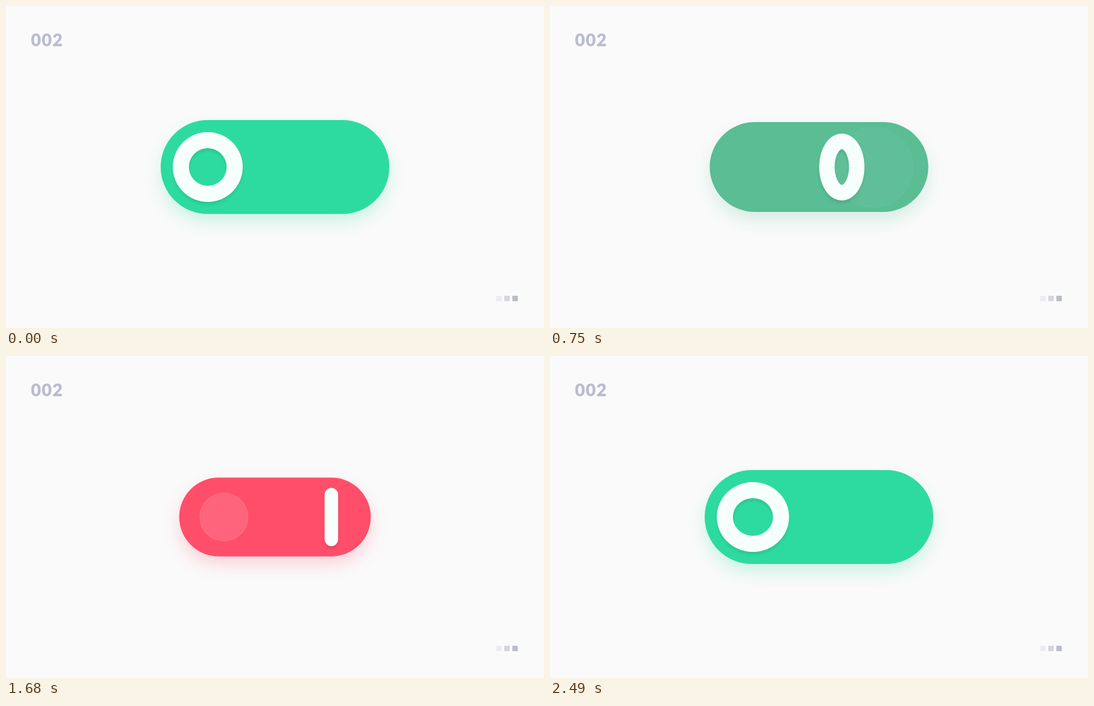
Animation, 800 px wide and 480 px high, one loop 2520 ms. Source, as an HTML page with a canvas:

```html
<!DOCTYPE html>
<html lang="en">
<head>
<meta charset="utf-8">
<title>Toggle switch</title>
<style>
  html, body { margin: 0; width: 100%; height: 100%; overflow: hidden; background: #fafafa; }
  canvas { position: absolute; left: 0; top: 0; }
  .label {
    position: absolute; left: 37px; top: 34px;
    font: 900 26px/32px Lato, sans-serif; letter-spacing: .9px; color: #b8bdce;
  }
  .dot { position: absolute; top: 432px; width: 8px; height: 8px; }
</style>
</head>
<body>
<canvas id="stage" width="800" height="480"></canvas>
<div class="label">002</div>
<div class="dot" style="left:729px;background:#ecedf0"></div>
<div class="dot" style="left:741px;background:#d2d5dd"></div>
<div class="dot" style="left:753px;background:#b8bdce"></div>
<script>
const ctx = document.getElementById('stage').getContext('2d');
const STEP = 30, LOOP = 2520;
const CX = 400, CY = 240;
const GREEN = [45, 219, 160], RED = [255, 78, 106];
const OFF_LAG = 39; // steps between the two taps

// knob ring width over time: [step, width]
const WIDTHS = [
  [17, 80], [20, 73], [23, 60], [26, 39.5], [28, 20], [30, 10], [33, 6], [37, 4], [41, 0],
  [56, 0], [59, 7], [62, 20], [65, 40.5], [67, 60], [70, 80], [73, 87], [77, 87.5], [83, 83.5]
];

const clamp = x => Math.min(1, Math.max(0, x));
const span = (n, a, b) => clamp((n - a) / (b - a));
const smooth = t => t * t * (3 - 2 * t);
const cubic = t => t < .5 ? 4 * t ** 3 : 1 - 4 * (1 - t) ** 3;
const mix = (a, b, t) => a + (b - a) * t;

function lookup(table, n) {
  if (n <= table[0][0]) return table[0][1];
  for (let i = 1; i < table.length; i++) {
    const [a, va] = table[i - 1], [b, vb] = table[i];
    if (n <= b) return mix(va, vb, (n - a) / (b - a));
  }
  return table[table.length - 1][1];
}

function shadow(color, y, blur) {
  ctx.shadowColor = color;
  ctx.shadowOffsetY = y;
  ctx.shadowBlur = blur;
}

function pillPath(s) {
  ctx.beginPath();
  ctx.roundRect(CX - 170 * s, CY - 70 * s, 340 * s, 140 * s, 70 * s);
}

function drawRipple(x, start, n, phase) {
  const r = 100 * smooth(span(n, start, start + 26));
  const fade = 1 - span(phase, 20, 27);
  if (r <= 0 || fade <= 0) return;
  ctx.beginPath();
  ctx.arc(x, CY, r, 0, 2 * Math.PI);
  ctx.fillStyle = `rgba(255,255,255,${.125 * fade})`;
  ctx.fill();
  ctx.lineWidth = 1.2;
  ctx.strokeStyle = `rgba(255,255,255,${.13 * fade})`;
  ctx.stroke();
}

function drawKnob(x, width, s) {
  const rx = Math.max(.01, width / 2), parts = 120;
  ctx.save();
  ctx.translate(CX, CY);
  ctx.scale(s, s);
  ctx.beginPath();
  for (let i = 0; i < parts; i++) {
    const a = 2 * Math.PI * i / parts;
    ctx.lineTo(x - CX + rx * Math.cos(a), 40 * Math.sin(a));
  }
  ctx.closePath();
  ctx.lineWidth = 24;
  ctx.lineJoin = 'round';
  ctx.strokeStyle = '#f7fffd';
  shadow('rgba(0,0,0,.09)', 4, 4);
  ctx.stroke();
  ctx.restore();
}

function draw(n) {
  const back = n >= 44;
  const phase = back ? n - OFF_LAG : n;
  const press = phase < 19.7 ? smooth(span(phase, 10, 19.7)) : 1 - smooth(span(phase, 19.7, 27.3));
  const s = 1 - .2 * press;

  const turn = smooth(span(phase, 22, 32));
  const rgb = GREEN.map((g, i) => Math.round(mix(g, RED[i], back ? 1 - turn : turn)));

  const width = lookup(WIDTHS, n);
  const go = cubic(span(phase, 17.9, 30.4));
  const x = back ? Math.max(mix(500, 300, go), 260 + width / 2) : mix(300, 500, go);

  ctx.clearRect(0, 0, 800, 480);
  ctx.save();
  pillPath(s);
  ctx.fillStyle = `rgb(${rgb})`;
  shadow(`rgba(${rgb},.22)`, 12, 24);
  ctx.fill();
  ctx.restore();

  ctx.save();
  pillPath(s);
  ctx.clip();
  if (back) drawRipple(324, 45.5, n, phase);
  else drawRipple(480, 10.3, n, phase);
  ctx.restore();

  drawKnob(x, width, s);
}

const t0 = performance.now();
function tick() {
  const ms = (performance.now() - t0) % LOOP;
  draw(Math.floor(ms / STEP));
  requestAnimationFrame(tick);
}
tick();
</script>
</body>
</html>
```
